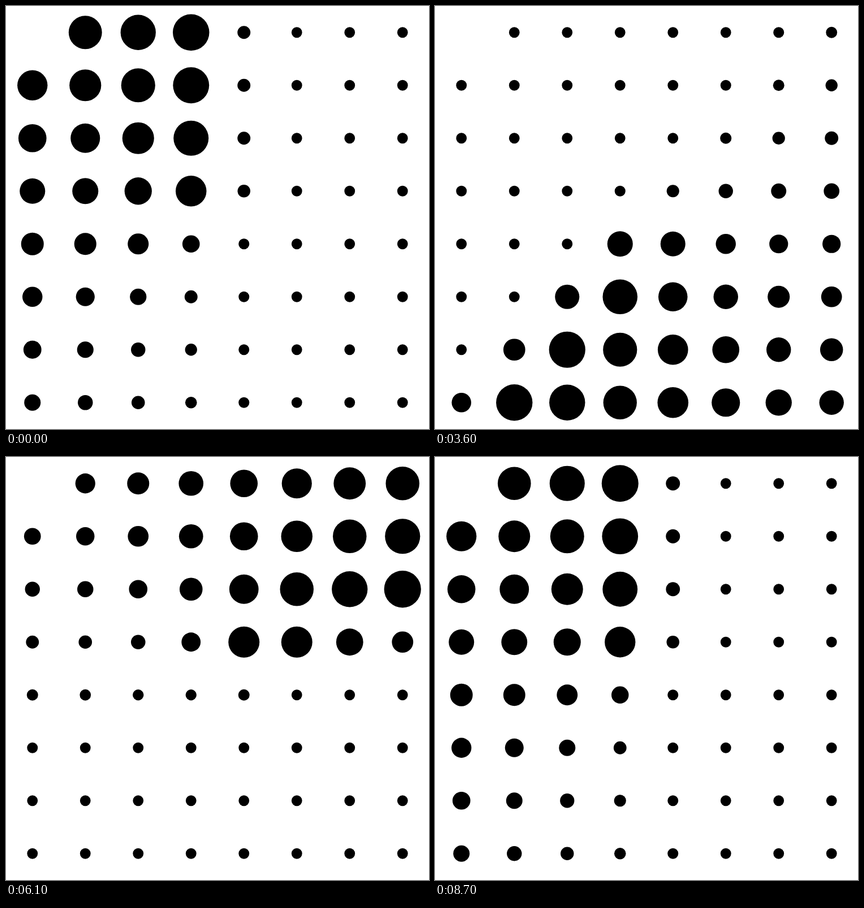
An HTML page with a canvas for the animation above (8900 ms loop, 748 by 748 pixels).

```html
<!DOCTYPE html>
<html lang="en">
<head>
<meta charset="utf-8">
<title>Halftone sweep</title>
<style>
  html, body { margin: 0; width: 100%; height: 100%; overflow: hidden; background: #fff; }
  canvas { display: block; width: 748px; height: 748px; }
</style>
</head>
<body>
<canvas id="stage" width="748" height="748"></canvas>
<script>
const SIZE = 748, GRID = 8, CELL = SIZE / GRID;
const LOOP = 8900, STEP = 100, LAST_STEP = 87;
const SAMPLES = 32, SOFTNESS = 0.34, EDGE_LEAD = 1.5;
const MIN_RADIUS = 9.4, GROWTH = 32.5, FADE_ANGLE = 193 * Math.PI / 180;
const TAU = Math.PI * 2;
const ctx = document.getElementById('stage').getContext('2d');

const smoothstep = t => t * t * (3 - 2 * t);

// Squared dot radius at an angle behind the sweeping edge.
function areaAt(behind) {
  const fade = Math.min(1, behind / FADE_ANGLE);
  return MIN_RADIUS ** 2 + (GROWTH * (1 - fade ** 1.15)) ** 2;
}

// Sample offsets across a cell, with weights that fall off softly past its border.
const reach = (1 + SOFTNESS) / 2;
const samples = Array.from({ length: SAMPLES }, (_, i) => {
  const u = ((i + 0.5) / SAMPLES * 2 - 1) * reach;
  return { offset: u * CELL, weight: Math.min(1, (reach - Math.abs(u)) / SOFTNESS) };
});

// Average the conic gradient over one cell, then turn the mean area into a radius.
function dotRadius(cx, cy, angle) {
  const sin = Math.sin(angle), cos = Math.cos(angle);
  let sum = 0, total = 0;
  for (const h of samples) {
    const x = cx - SIZE / 2 + h.offset;
    for (const v of samples) {
      const y = cy - SIZE / 2 + v.offset;
      const behind = Math.atan2(-x * cos + y * sin + EDGE_LEAD, -x * sin - y * cos);
      const weight = h.weight * v.weight;
      sum += weight * areaAt(behind < 0 ? behind + TAU : behind);
      total += weight;
    }
  }
  return Math.sqrt(sum / total);
}

function draw(step) {
  const angle = TAU * smoothstep((step + 2) / 90);
  ctx.fillStyle = '#fff';
  ctx.fillRect(0, 0, SIZE, SIZE);
  ctx.fillStyle = '#000';
  for (let cell = 1; cell < GRID * GRID; cell++) { // the first cell stays empty
    const x = (cell % GRID + 0.5) * CELL;
    const y = (Math.floor(cell / GRID) + 0.5) * CELL;
    ctx.beginPath();
    ctx.arc(x, y, dotRadius(x, y, angle), 0, TAU);
    ctx.fill();
  }
}

let shown = -1;
function tick() {
  const step = Math.min(LAST_STEP, Math.floor(performance.now() % LOOP / STEP));
  if (step !== shown) draw(shown = step);
  requestAnimationFrame(tick);
}
tick();
</script>
</body>
</html>
```
